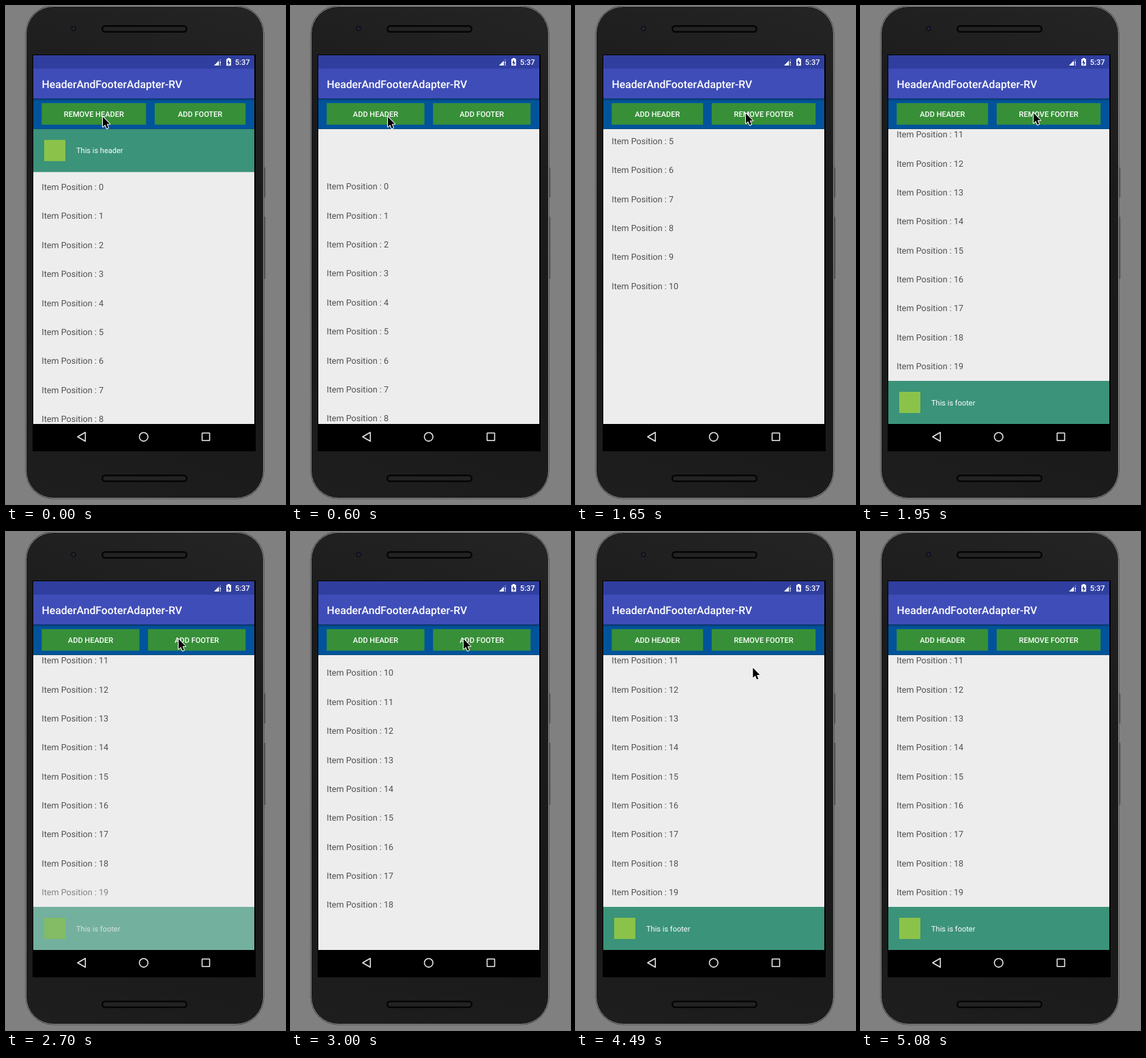
An HTML page with a canvas for the animation above (5.68 s loop, 409 by 728 pixels).

```html
<!DOCTYPE html>
<html lang="en">
<head>
<meta charset="utf-8">
<title>List with header and footer</title>
<style>
  html, body { margin: 0; width: 100%; height: 100%; overflow: hidden; background: #808080; }
  canvas { display: block; }
</style>
</head>
<body>
<canvas id="stage" width="409" height="728"></canvas>
<script>
const c = document.getElementById('stage').getContext('2d');
c.textRendering = 'geometricPrecision';
const LOOP = 5680, ROW = 42.375, EXTRA = 63, LIST_TOP = 179.7, LIST_END = 611;

const run = (start, count) => Array.from({ length: count }, (_, i) => start + 150 * i);
const samples = [0, ...run(300, 12), ...run(2550, 5), ...run(3440, 4), ...run(4490, 3), 4930, 5080];

const clamp = v => Math.min(1, Math.max(0, v));
const fade = (t, start) => clamp((t - start) / 120);
const slide = (t, start) => (1 - Math.cos(Math.PI * clamp((t - start) / 250))) / 2;

function rect(color, x, y, w, h, r = 0) {
  c.fillStyle = color;
  c.beginPath();
  c.roundRect(x, y, w, h, r);
  c.fill();
}

function outline(color, width, x, y, w, h, r) {
  c.strokeStyle = color;
  c.lineWidth = width;
  c.beginPath();
  c.roundRect(x, y, w, h, r);
  c.stroke();
}

function shape(color, path) {
  c.fillStyle = color;
  c.fill(new Path2D(path));
}

function text(str, x, y, size, color = '#fff', weight = 400, align = 'left') {
  c.font = `${weight} ${size}px Roboto, sans-serif`;
  c.textAlign = align;
  c.fillStyle = color;
  c.fillText(str, x, y);
}

function shade(x0, y0, x1, y1, ...stops) {
  const g = c.createLinearGradient(x0, y0, x1, y1);
  stops.forEach((color, i) => g.addColorStop(i / (stops.length - 1), color));
  return g;
}

function speaker(y) {
  rect('#050505', 140, y, 126, 11, 5.5);
  rect('#232323', 142.5, y + 2.5, 121, 6, 3);
}

function phone() {
  rect('#808080', 0, 0, 409, 728);
  rect('#5c5c5c', 378, 236, 2.5, 44, 1);
  rect('#5c5c5c', 378, 308, 2.5, 91, 1);
  rect('#2c2c2c', 28.5, -.5, 350, 721, 41);
  rect(shade(60, 728, 350, 0, '#1e1e1e', '#191919', '#1b1b1b', '#242424'), 30, 1, 347, 718, 40);
  outline('#8c8c8c', 1, 29.5, .5, 348, 719, 40);
  speaker(28);
  speaker(685);
  rect('#141418', 95, 29, 8, 8, 4);
  rect('#2c2c5c', 97.5, 31.5, 3, 3, 1.5);
  rect('#000', 39, 71, 327, 580);
}

function statusBar() {
  rect('#303f9f', 40, 72, 324, 20);
  shape('rgba(255,255,255,.3)', 'M305 87L315 77V80H312V87Z');
  shape('#fff', 'M305 87L312 80V87Z');
  rect('#fff', 313.4, 81, 1.4, 3.6);
  rect('#fff', 313.4, 85.6, 1.4, 1.4);
  rect('#fff', 323, 77.3, 7, 10, .8);
  rect('#fff', 325, 76, 3, 2);
  shape('#303f9f', 'M327 78.5L324 83.2H326V87L329 82.2H327Z');
  text('5:37', 357.5, 86, 11.03, '#fff', 500, 'right');
}

function button(label, x, w) {
  rect('#378f38', x, 142, w, 31.5);
  text(label, x + w / 2, 162, 11.03, '#fff', 500, 'center');
}

function toolbars(t) {
  rect('#3f4db8', 40, 91.6, 324, 44);
  text('HeaderAndFooterAdapter-RV', 52.5, 119.7, 15.75, '#fff', 500);
  rect('#01539b', 40, 135.6, 324, LIST_TOP - 135.6);
  rect(shade(0, 135.6, 0, 139.6, 'rgba(0,0,0,.25)', 'rgba(0,0,0,0)'), 40, 135.6, 324, 4);
  const hasHeader = t < 450;
  const hasFooter = t >= 1500 && t < 2650 || t >= 3440;
  const left = hasHeader ? 153 : hasFooter ? 134 : 143.3;
  const x = 52.3 + left + 12.6;
  button(hasHeader ? 'REMOVE HEADER' : 'ADD HEADER', 52.3, left);
  button(hasFooter ? 'REMOVE FOOTER' : 'ADD FOOTER', x, 351.2 - x);
}

function banner(label, y, alpha) {
  c.globalAlpha = alpha;
  rect('#3b9379', 40, y, 324, EXTRA);
  rect('#8bc34a', 56, y + 16, 31, 31);
  text(label, 103, y + 35.6, 11.03);
  c.globalAlpha = 1;
}

function list(t) {
  rect('#ededed', 40, LIST_TOP, 324, LIST_END - LIST_TOP);
  c.save();
  c.beginPath();
  c.rect(40, LIST_TOP, 324, LIST_END - LIST_TOP);
  c.clip();

  const scroll = EXTRA * (slide(t, 583) - 1) + 480 * slide(t, 1533)
    - EXTRA * slide(t, 2781) + EXTRA * slide(t, 3490);
  const added = fade(t, 1783), removed = fade(t, 2661);
  for (let i = 0; i < 20; i++) {
    const y = 206 + ROW * i - scroll;
    if (y < 170 || y > 625) continue;
    c.globalAlpha = i < 11 ? 1 : i < 19 ? added : added - removed + fade(t, 3028);
    text('Item Position : ' + i, 52.3, y, 12.6, '#505050');
  }
  banner('This is header', LIST_TOP, 1 - fade(t, 463));
  banner('This is footer', 1028 - scroll, added - removed + fade(t, 3742));
  c.restore();
}

function navBar() {
  rect('#000', 40, LIST_END, 324, 39);
  c.strokeStyle = '#e4e4e4';
  c.lineWidth = 1.6;
  c.lineJoin = 'round';
  c.stroke(new Path2D('M105 629.8L116.3 623.3V636.3Z'));
  outline('#e4e4e4', 1.6, 195.5, 623.5, 12.6, 12.6, 6.3);
  outline('#e4e4e4', 1.6, 287.5, 624.3, 11, 11, .5);
}

const arrow = new Path2D('M0 0V14.5L3.4 11.5L5.7 17L8 16L5.7 10.6H10.2Z');
const path = [
  [0, 142, 162], [750, 142, 162], [1350, 247, 157.5], [1650, 249, 157],
  [1950, 253, 156.5], [4400, 253, 156.5], [4930, 336, 703]
];

function cursor(t) {
  if (t >= 5080) return;
  const k = Math.max(1, path.findIndex(p => p[0] >= t));
  const [a, b] = [path[k - 1], path[k]];
  const u = (t - a[0]) / (b[0] - a[0]), e = u * u * (3 - 2 * u);
  c.save();
  c.translate(a[1] + (b[1] - a[1]) * e, a[2] + (b[2] - a[2]) * e);
  c.lineWidth = 2;
  c.lineJoin = 'round';
  c.strokeStyle = '#fff';
  c.stroke(arrow);
  c.fillStyle = '#000';
  c.fill(arrow);
  c.restore();
}

const origin = performance.now();
function draw() {
  const now = (performance.now() - origin) % LOOP;
  const t = samples.filter(s => s <= now).pop();
  phone();
  statusBar();
  list(t);
  toolbars(t);
  navBar();
  cursor(t);
  requestAnimationFrame(draw);
}
draw();
</script>
</body>
</html>
```
